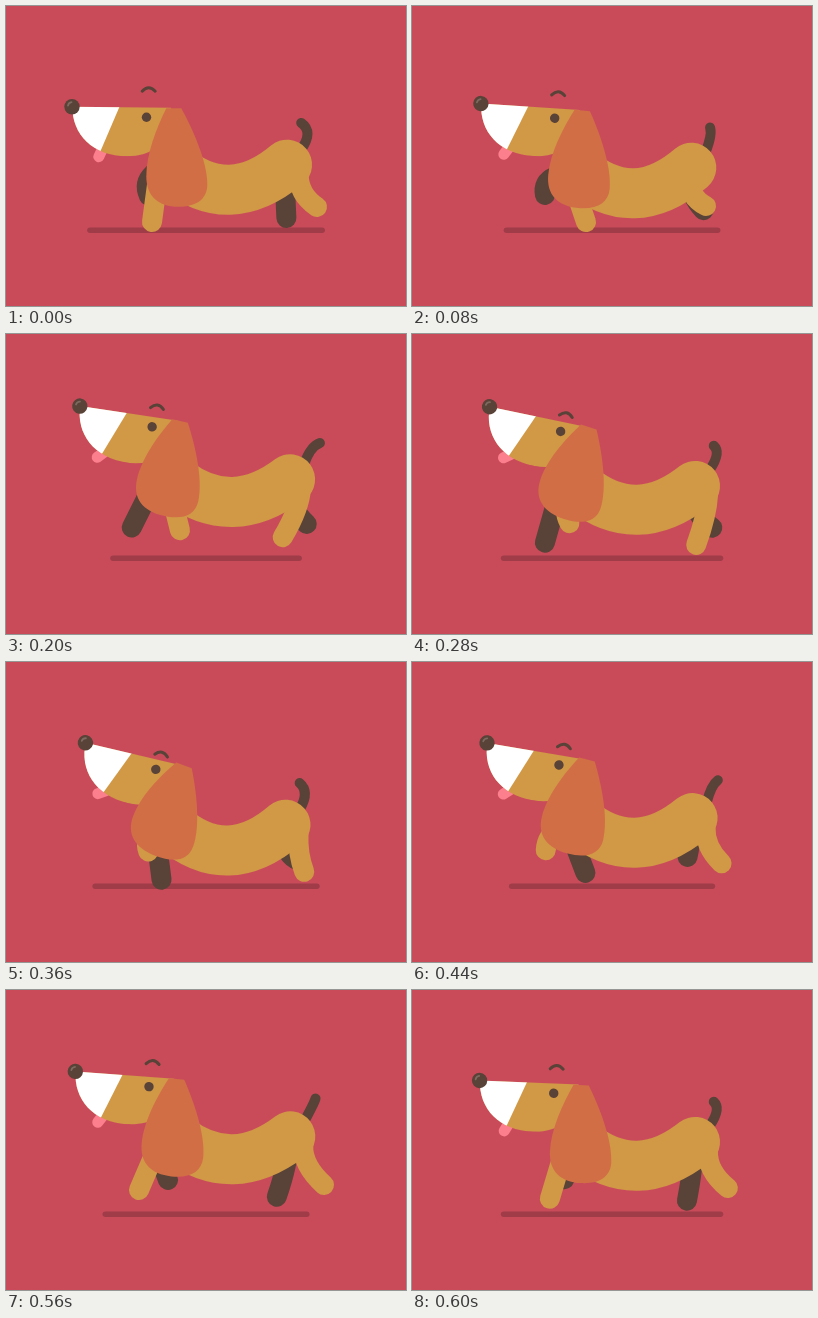
Animation of 400x300 px, one loop 0.64 s. Source, as an HTML page:

```html
<!DOCTYPE html>
<html lang="en">
<head>
<meta charset="utf-8">
<title>Running dog</title>
<style>
  html, body { margin: 0; width: 100%; height: 100%; overflow: hidden; background: #c94b5a; }
  svg { display: block; width: 100%; height: 100%; }
  .limb { fill: none; stroke-linecap: round; stroke-width: 20; }
  .tan { stroke: #d19846; }
  .dark { stroke: #594237; }
</style>
</head>
<body>
<svg viewBox="0 0 400 300">
  <defs>
    <clipPath id="headShape">
      <path d="M-109-1.5C-109 26-89 48-54 48C-43 48-32 45-22 38L-10-.5Z"/>
    </clipPath>
  </defs>
  <path id="shadow" class="limb" stroke="#a03c48" style="stroke-width:5.5"/>
  <path id="tail" class="limb dark" style="stroke-width:10"/>
  <path id="farBack" class="limb dark"/>
  <path id="farFront" class="limb dark"/>
  <path id="nearFront" class="limb tan"/>
  <path id="nearBack" class="limb tan"/>
  <path id="body" class="limb tan" style="stroke-width:50"/>
  <g id="head">
    <path id="tongue" class="limb" stroke="#fc7f8d" style="stroke-width:11" d="M-79 41L-82.5 48.5"/>
    <g clip-path="url(#headShape)">
      <rect x="-115" y="-5" width="115" height="57" fill="#d19846"/>
      <path fill="#fff" d="M-115-5H-60.3L-84.5 51.5H-115Z"/>
    </g>
    <circle cx="-109.3" cy="-1.5" r="7.7" fill="#594237"/>
    <path class="limb" stroke="#7d6a60" style="stroke-width:1.8" d="M-113.3-2.5Q-112.8-5.5-109.8-6"/>
    <circle cx="-34.8" cy="9" r="4.7" fill="#594237"/>
    <path id="brow" class="limb dark" style="stroke-width:3" d="M-6.5 2Q0-5 6.5 2"/>
  </g>
  <path id="ear" fill="#d16e46" d="M-15 0H0C11 20 26 53 26 76C26 91 15 98.5-3 98.5C-23 98.5-35 88-35 68C-35 46-25 20-15 0Z"/>
</svg>
<script>
const LOOP = 640, BOUNCE = LOOP / 2, STEP = 40;
const part = {};
document.querySelectorAll("svg [id]").forEach(el => part[el.id] = el);

// Cosine wave that is 1 at the given time.
const wave = (t, period, peak) => Math.cos((t - peak) / period * 2 * Math.PI);

// Straight rise from 0 to 1 at the turn, then straight back.
function ramp(t, period, turn) {
  const p = t % period;
  return p < turn ? p / turn : (period - p) / (period - turn);
}

// Point on a smooth closed path, passing its points at even intervals.
function follow(points, t) {
  const n = points.length, s = t / LOOP * n, i = Math.floor(s), u = s - i;
  const [a, b, c, d] = [n - 1, 0, 1, 2].map(k => points[(i + k) % n]);
  return b.map((p, k) => p + u / 2 * (c[k] - a[k] + u * (2 * a[k] - 5 * p + 4 * c[k] - d[k]
    + u * (3 * (p - c[k]) + d[k] - a[k]))));
}

// One stride of a foot; the far legs run half a loop behind.
const frontStride = [[146, 216], [174, 216], [178, 204], [167, 190], [148, 190], [138, 189], [131, 189], [133, 200]];
const backStride = [[311, 201], [294, 200], [278, 199], [279, 208], [291, 212], [305, 206], [313, 197], [318, 195]];

const curve = (name, a, b, c) => part[name].setAttribute("d", `M${a}Q${b} ${c}`);
const place = (name, value) => part[name].setAttribute("transform", value);

function frontLeg(name, [x, y], foot) {
  const hip = [x + (foot[0] - 155) * 0.3, y];
  const dx = foot[0] - hip[0], dy = foot[1] - hip[1], reach = Math.hypot(dx, dy);
  const bend = 0.25 * Math.sqrt(Math.max(0, 1600 - reach * reach)) / reach;
  curve(name, hip, [hip[0] + dx / 2 - dy * bend, hip[1] + dy / 2 + dx * bend], foot);
}

function draw(t) {
  const half = t + LOOP / 2;
  const bounce = 9 * wave(t, BOUNCE, 52);
  const nod = 13.6 * ramp(t, LOOP, 340);
  const rx = 281.8 - 2.6 * wave(t, BOUNCE, 65), ry = 154 + bounce;
  const at = (x, y) => [rx + x, ry + y];

  const width = 119 - 25 * ramp(t, BOUNCE, 190);
  part.shadow.setAttribute("d", `M${202.9 - width} 224.3H${197.2 + width}`);

  const wag = wave(t, BOUNCE, 180);
  curve("tail", at(14, -15), at(22.5 + 4.5 * wave(t, BOUNCE, -15), -33), at(22 + 8.5 * wag, 3 * wag - 39));
  curve("body", at(-113, 3), at(-58, 47 + bounce * 0.35), at(0, 0));

  const [fx, fy] = follow(frontStride, half);
  frontLeg("nearFront", at(-126, 10), follow(frontStride, t));
  frontLeg("farFront", at(-130, 9), [fx - 5, fy]);

  // The near knee tucks under once per loop; the far foot takes a shorter, higher stride.
  const knee = 12 - 17 * Math.max(0, wave(t, LOOP, 105)) ** 4;
  const [bx, by] = follow(backStride, half);
  curve("nearBack", at(knee + 1, 9), at(knee, 29), follow(backStride, t));
  curve("farBack", at(-2, 9), at(-2, 27), [286 + (bx - 298) * 0.8, 212 + (by - 212) * 1.3]);

  const neck = `translate(${175.3 + nod * 0.82} ${97.5 + bounce})`;
  place("head", `${neck} rotate(${nod})`);
  place("tongue", `rotate(${nod * 2.6} -79 41)`);
  place("brow", `translate(-32.6 ${nod * 0.9 - 19})`);
  place("ear", `${neck} rotate(${nod * 1.6}) scale(${1 + nod * 0.0075} ${1 - nod * 0.003})`);
}

const start = performance.now();
function tick() {
  const elapsed = (performance.now() - start) % LOOP;
  draw(Math.floor(elapsed / STEP) * STEP);
  requestAnimationFrame(tick);
}
tick();
</script>
</body>
</html>
```
